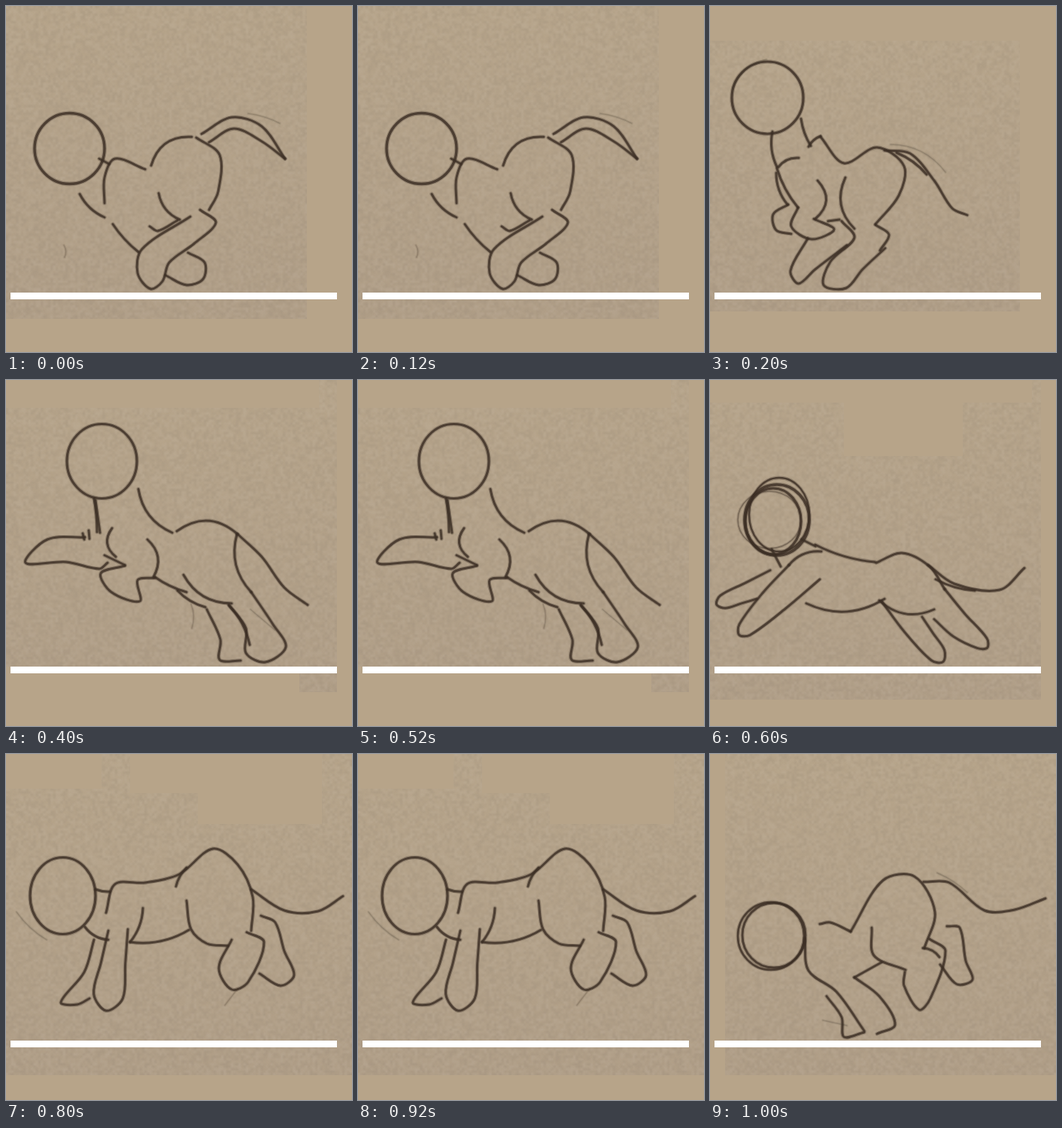
Animation, 460 px wide and 460 px high, one loop 1200 ms. Source, as an HTML page with a canvas:

```html
<!DOCTYPE html>
<html lang="en">
<head>
<meta charset="utf-8">
<title>Gallop sketch</title>
<style>
html, body { margin: 0; width: 100%; height: 100%; overflow: hidden; background: #b7a489; }
canvas { display: block; width: 100%; height: 100%; }
</style>
</head>
<body>
<canvas id="stage" width="460" height="460"></canvas>
<script>
const SIZE = 460, HOLD = 200, BLANK = '#b7a489', INK = '#3b2e24';
let g;

function layer(size) {
  const c = document.createElement('canvas');
  c.width = c.height = size;
  return c;
}

function random(seed) {
  return () => {
    seed = (seed * 1664525 + 1013904223) >>> 0;
    return seed / 4294967296;
  };
}

// Soft paper mottling: a small noise field enlarged smoothly.
function grain(seed, cells) {
  const c = layer(cells), gc = c.getContext('2d');
  const img = gc.createImageData(cells, cells), rnd = random(seed);
  for (let i = 0; i < img.data.length; i += 4) {
    const v = rnd() - 0.5;
    img.data.fill(v > 0 ? 240 : 80, i, i + 3);
    img.data[i + 3] = Math.abs(v) * 36;
  }
  gc.putImageData(img, 0, 0);
  return c;
}

// A sheet with its grain, then bare patches [x, y, w, h] on top.
function paper(x, y, w, h, ...gaps) {
  const fill = g.createLinearGradient(0, y, 0, y + h);
  fill.addColorStop(0, '#b6a48a');
  fill.addColorStop(1, '#b09e87');
  g.save();
  g.beginPath();
  g.rect(x, y, w, h);
  g.clip();
  g.fillStyle = fill;
  g.fillRect(x, y, w, h);
  g.drawImage(grain(x + y * 31 + w * 977 + h, 140), 0, 0, SIZE, SIZE);
  g.restore();
  g.fillStyle = BLANK;
  gaps.forEach(gap => g.fillRect(...gap));
}

// One pencil mark: a soft edge around a dark core.
function pencil(path, width = 3, alpha = 1) {
  for (const [extra, a] of [[2.4, 0.25], [0, 0.8]]) {
    g.globalAlpha = a * alpha;
    g.lineWidth = width + extra;
    g.stroke(path);
  }
  g.globalAlpha = 1;
}

function head(x, y, rx, ry, tilt = 0, width = 3.2, alpha = 1) {
  const ring = new Path2D();
  ring.ellipse(x, y, rx, ry, tilt, 0, Math.PI * 2);
  pencil(ring, width, alpha);
}

// Bow from a to b; a positive bulge lies to the left of the direction of travel.
function bow(x0, y0, x1, y1, bulge) {
  const dx = x1 - x0, dy = y1 - y0, k = 2 * bulge / Math.hypot(dx, dy);
  const path = new Path2D();
  path.moveTo(x0, y0);
  path.quadraticCurveTo((x0 + x1) / 2 + dy * k, (y0 + y1) / 2 - dx * k, x1, y1);
  return path;
}

const arc = (...a) => pencil(bow(...a));
const faint = (...a) => pencil(bow(...a), 1.6, 0.25);

// Smooth curve through points, with handles scaled by chord length.
function spline(p) {
  const path = new Path2D();
  const dist = (a, b) => Math.hypot(b[0] - a[0], b[1] - a[1]);
  path.moveTo(...p[0]);
  for (let i = 0; i < p.length - 1; i++) {
    const b = p[i], c = p[i + 1], a = p[i - 1] || b, d = p[i + 2] || c;
    const len = dist(b, c);
    const k = len / 3 / (dist(a, b) + len), m = len / 3 / (len + dist(c, d));
    path.bezierCurveTo(
      b[0] + (c[0] - a[0]) * k, b[1] + (c[1] - a[1]) * k,
      c[0] - (d[0] - b[0]) * m, c[1] - (d[1] - b[1]) * m, c[0], c[1]);
  }
  return path;
}

const line = text => pencil(spline(text.split(' ').map(s => s.split(',').map(Number))));

// Leg outline: start, round paw of radius r, end; each side may bend.
function limb(sx, sy, px, py, r, ex, ey, bendA = 0, bendB = 0) {
  let dx = px - (sx + ex) / 2, dy = py - (sy + ey) / 2;
  const len = Math.hypot(dx, dy);
  dx /= len;
  dy /= len;
  const side = Math.sign((sx - ex) * -dy + (sy - ey) * dx);
  const nx = -dy * side, ny = dx * side;
  const a = [px + nx * r, py + ny * r], b = [px - nx * r, py - ny * r];
  const mid = (x, y, q, bend) => [(x + q[0]) / 2 + nx * bend, (y + q[1]) / 2 + ny * bend];
  pencil(spline([
    [sx, sy], mid(sx, sy, a, bendA), a, [px + dx * r, py + dy * r],
    b, mid(ex, ey, b, bendB), [ex, ey]
  ]));
}

function crouch() {
  paper(0, 0, 400, 416);
  head(84.5, 189.5, 46.5, 47, 0, 3.4);
  arc(124, 203, 137, 210, 0);
  line('131,262 131,228 145,203 185,217');
  arc(193, 212, 247, 174, 13);
  line('253,175 284,198 282,247 270,271');
  arc(98, 250, 131, 281, -4);
  arc(142, 290, 176, 327, -2);
  arc(203, 249, 231, 284, -6);
  line('191,293 202,299 228,285');
  line('258,271 279,288 250,316 217,341 208,366 192,376 175,355 181,323 245,280');
  line('212,358 240,371 262,363 264,341 242,328');
  line('260,170 300,148 340,160 371,203');
  line('270,181 303,163 340,180 371,203');
  faint(322, 143, 364, 156, 2);
  faint(77, 318, 78, 334, 2);
}

function rear() {
  paper(0, 46, 412, 360);
  head(76.5, 122, 47.5, 48);
  faint(30, 110, 75, 71, 8);
  arc(83, 167, 89, 214, -4);
  arc(91, 214, 118, 202, 4);
  arc(121, 150, 134, 186, -2);
  arc(131, 187, 147, 173, 2);
  line('147,174 178,209 222,188 258,213 251,252 220,290');
  arc(180, 228, 192, 296, -12);
  arc(143, 232, 140, 283, 13);
  arc(88, 222, 103, 264, -4);
  arc(89, 216, 117, 268, -3);
  line('104,264 84,277 88,298 108,303');
  line('117,268 108,293 135,310 165,297 138,283');
  arc(157, 286, 172, 284, 0);
  line('130,309 107,352 118,369 140,350 182,318');
  line('220,291 238,304 226,325');
  line('233,322 203,350 181,375 151,371 160,340 192,308 175,286');
  line('232,192 266,196 298,232 322,269 342,278');
  arc(248, 195, 288, 224, 3);
  faint(240, 184, 313, 221, 10);
}

function leap() {
  paper(0, 0, 440, 415, [0, 0, 416, 37], [0, 381, 390, 34]);
  head(127.5, 108, 46.5, 49.5);
  arc(117, 158, 121, 202, 1);
  arc(119, 160, 125, 203, 0);
  arc(176, 145, 221, 203, -10);
  arc(227, 201, 308, 205, 16);
  arc(307, 205, 326, 282, -11);
  arc(198, 262, 240, 282, -2);
  arc(236, 259, 300, 297, -11);
  arc(228, 280, 265, 302, -3);
  arc(188, 212, 196, 262, 10);
  arc(141, 197, 146, 235, -9);
  line('105,209 55,212 26,243 80,242 124,251 135,243');
  arc(102, 204, 104, 212, 0);
  arc(110, 200, 111, 211, 0);
  arc(131, 233, 158, 246, 0);
  line('158,247 126,257 140,282 178,294 175,266 198,263');
  line('326,282 355,325 372,355 345,375 319,363 319,330 296,299');
  arc(297, 300, 324, 352, 4);
  line('267,305 285,345 284,372 312,373');
  line('308,205 340,235 370,276 401,299');
  faint(325, 305, 357, 332, 0);
  faint(246, 298, 247, 330, 3);
}

function stretch() {
  paper(0, 0, 440, 425, [0, 0, 428, 30], [178, 30, 158, 71]);
  head(89, 186, 43, 47, 0, 3.6);
  head(84, 188, 37, 44);
  head(92, 179, 40, 49, 0, 2.4);
  head(79, 186, 42, 38, 0, 1.6, 0.5);
  arc(82, 225, 94, 248, 0);
  arc(122, 212, 140, 221, 0);
  arc(105, 246, 148, 228, 6);
  arc(140, 219, 219, 242, -4);
  line('221,243 255,230 292,248 312,278');
  arc(128, 297, 232, 291, -14);
  arc(225, 293, 298, 305, -12);
  limb(80, 253, 17, 295, 9, 62, 291);
  limb(105, 246, 46, 332, 10, 146, 265, 3, -2);
  limb(228, 294, 303, 366, 11, 282, 315, 3);
  limb(298, 318, 362, 350, 9, 312, 278, 5, 1);
  line('290,246 325,271 385,279 418,250');
  arc(300, 265, 352, 280, -3);
}

function land() {
  paper(0, 0, 460, 427, [0, 0, 127, 46], [165, 0, 255, 52], [255, 0, 165, 93]);
  head(75.5, 188.5, 43.5, 51);
  arc(119, 180, 138, 183, -1);
  line('133,211 145,173 185,171 230,160 275,126 308,147 328,190 326,235');
  arc(226, 176, 240, 151, 2);
  arc(105, 230, 136, 247, -4);
  arc(182, 205, 165, 250, 4);
  arc(165, 250, 243, 234, -7);
  line('240,195 246,233 267,252 295,255');
  line('117,247 104,290 73,330 95,333 111,325');
  limb(136, 235, 136, 322, 19.5, 162, 233);
  line('300,247 283,285 300,313 322,303 343,250 320,237');
  line('339,215 358,224 370,262 383,294 365,308 337,292');
  line('326,180 370,208 415,209 448,189');
  faint(14, 210, 54, 247, -3);
  faint(308, 312, 291, 334, 0);
}

function gather() {
  paper(20, 0, 440, 427);
  head(85, 241, 42, 43, 0, 2.8);
  head(81, 242, 44, 45, 0, 2.6);
  line('126,245 131,288 168,316 205,368');
  line('146,226 160,224 187,236');
  line('187,236 230,168 272,163 299,210 285,258');
  line('215,231 218,268 260,287');
  line('205,370 178,376 175,350 155,322');
  arc(228, 277, 192, 297, 0);
  line('192,297 225,322 246,360 222,372');
  line('259,290 258,308 278,340 293,325 313,262 292,246');
  arc(283, 258, 305, 270, 3);
  line('315,229 332,231 340,275 349,300 328,306 306,280');
  line('284,170 318,171 365,208 405,207 446,192');
  faint(150, 354, 182, 361, 0);
  faint(302, 158, 342, 184, 2);
}

function render(pose) {
  const c = layer(SIZE);
  g = c.getContext('2d');
  g.fillStyle = BLANK;
  g.fillRect(0, 0, SIZE, SIZE);
  g.lineCap = g.lineJoin = 'round';
  g.strokeStyle = INK;
  pose();
  g.fillStyle = '#fff';
  g.fillRect(6, 381, 434, 9);
  return c;
}

const drawings = [crouch, rear, leap, stretch, land, gather].map(render);
const ctx = document.getElementById('stage').getContext('2d');
const start = performance.now();

function tick() {
  const step = Math.floor((performance.now() - start) / HOLD) % drawings.length;
  ctx.drawImage(drawings[step], 0, 0);
  requestAnimationFrame(tick);
}
tick();
</script>
</body>
</html>
```
